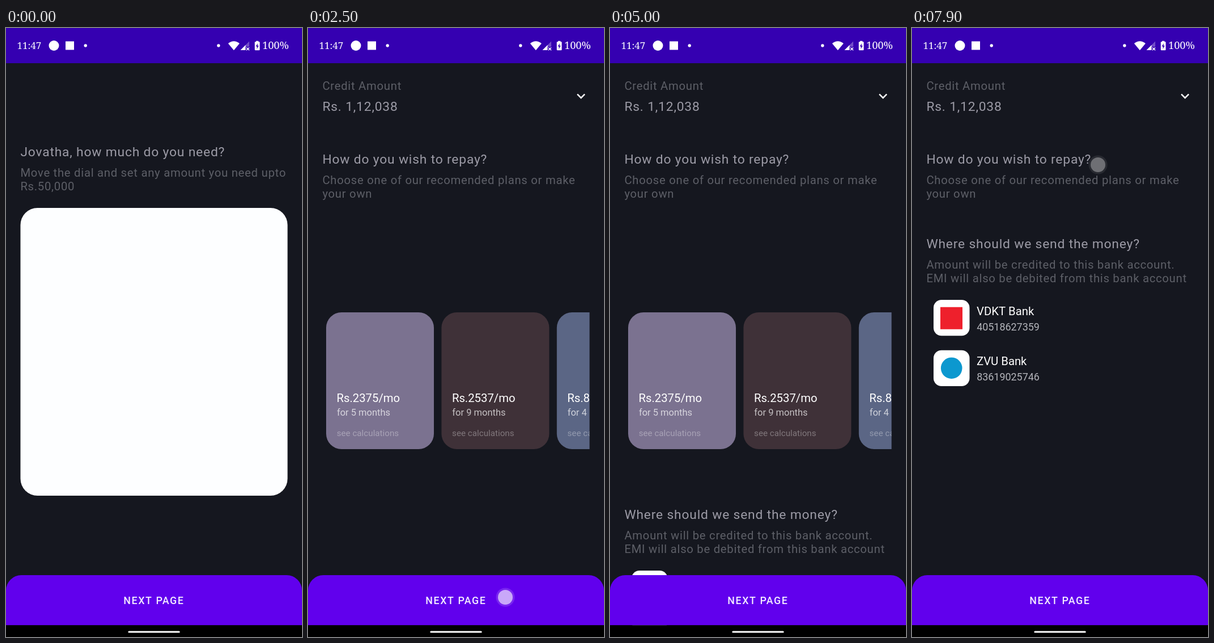
Recreate the animation shown at these times as an HTML page with a canvas. Size 522 by 1073 pixels, loop 8 s.

```html
<!DOCTYPE html>
<html lang="en">
<head>
<meta charset="utf-8">
<title>Loan steps</title>
<style>
  html, body { margin: 0; width: 100%; height: 100%; overflow: hidden; background: #15171f; }
  canvas { display: block; width: 522px; height: 1073px; }
</style>
</head>
<body>
<canvas id="stage"></canvas>
<script>
const W = 522, H = 1073, LOOP = 8000, STEP = 100;
const canvas = document.getElementById('stage');
const ctx = canvas.getContext('2d');
const dpr = window.devicePixelRatio || 1;
canvas.width = W * dpr;
canvas.height = H * dpr;

const SANS = 'Roboto, sans-serif';
const SERIF = '"Noto Serif", serif';
const BG = '#15171f', BRIGHT = '#9c9ba6', DIM = '#5d5f67';

// Taps: start time and place
const TAPS = [[500, 358, 1007], [2500, 348, 1003], [4500, 328, 241], [6000, 332, 1015], [7700, 328, 241]];

const PLANS = [
  { x: 32, color: '#7b7290', rate: 'Rs.2375/mo', term: 'for 5 months' },
  { x: 235.4, color: '#3f3138', rate: 'Rs.2537/mo', term: 'for 9 months' },
  { x: 438.8, color: '#5b6685', rate: 'Rs.8250/mo', term: 'for 4 months' }
];

// Standard curve: cubic-bezier(.4, 0, .2, 1)
function ease(x) {
  if (x <= 0) return 0;
  if (x >= 1) return 1;
  let lo = 0, hi = 1, u = 0.5;
  for (let i = 0; i < 24; i++) {
    u = (lo + hi) / 2;
    const v = 1 - u;
    if (1.2 * v * v * u + 0.6 * v * u * u + u * u * u < x) lo = u; else hi = u;
  }
  return 3 * (1 - u) * u * u + u * u * u;
}

const progress = (t, from, to) => ease((t - from) / (to - from));

function text(str, x, y, size, color, spacing = 0, family = SANS, weight = 400) {
  ctx.font = `${weight} ${size}px ${family}`;
  ctx.letterSpacing = spacing + 'px';
  ctx.fillStyle = color;
  ctx.fillText(str, x, y);
}

const title = (str, x, y) => text(str, x, y, 22.84, BRIGHT, 0.81);
const note = (str, x, y) => text(str, x, y, 20.3, DIM, 0.72);

function box(x, y, w, h, r, color) {
  ctx.fillStyle = color;
  ctx.beginPath();
  ctx.roundRect(x, y, w, h, r);
  ctx.fill();
}

function disc(x, y, r, color) {
  ctx.fillStyle = color;
  ctx.beginPath();
  ctx.arc(x, y, r, 0, Math.PI * 2);
  ctx.fill();
}

function shape(color, ...pts) {
  ctx.fillStyle = color;
  ctx.beginPath();
  pts.forEach(([x, y]) => ctx.lineTo(x, y));
  ctx.fill();
}

function line(width, ...pts) {
  ctx.strokeStyle = '#fff';
  ctx.lineWidth = width;
  ctx.beginPath();
  pts.forEach(([x, y]) => ctx.lineTo(x, y));
  ctx.stroke();
}

const chevron = y => line(2.5, [475, y - 3.5], [481.5, y + 3], [488, y - 3.5]);

function clipped(x, y, w, h, draw) {
  ctx.save();
  ctx.beginPath();
  ctx.rect(x, y, w, h);
  ctx.clip();
  draw();
  ctx.restore();
}

function amountPage() {
  title('Jovatha, how much do you need?', 25.4, 226);
  note('Move the dial and set any amount you need upto', 25.4, 262);
  note('Rs.50,000', 25.4, 286);
  box(25.5, 317, 471, 507, 30, '#fdfeff');
}

function creditRow() {
  note('Credit Amount', 25.4, 109.3);
  title('Rs. 1,12,038', 25.4, 146);
  chevron(120.2);
}

function emiRow() {
  note('EMI', 25.4, 236.2);
  title('Rs. 4,600/mo', 25.4, 266);
  note('Duration', 260.7, 236.2);
  title('12 months', 260.7, 266);
  chevron(243.9);
}

function repayHead(dy = 0) {
  title('How do you wish to repay?', 25.4, 238.7 + dy);
  note('Choose one of our recomended plans or make', 25.4, 274.8 + dy);
  note('your own', 25.4, 298.7 + dy);
}

function plans(dy, bottom) {
  clipped(25, 62, 471.5, bottom - 62, () => {
    for (const p of PLANS) {
      box(p.x, 501 + dy, 190, 241, 27, p.color);
      text(p.rate, p.x + 18.5, 659 + dy, 20.3, '#fff');
      text(p.term, p.x + 18.9, 682.5 + dy, 16.5, 'rgba(255,255,255,.7)');
      text('see calculations', p.x + 18.7, 719 + dy, 15.2, 'rgba(255,255,255,.34)');
    }
  });
}

function account(name, number, y) {
  box(38, y, 63.5, 63.3, 14, '#fff');
  text(name, 114, y + 26.5, 20.3, '#fff');
  text(number, 114.2, y + 53.5, 17.9, '#b4b5bb');
}

// y is the baseline of the heading
function bankSection(y) {
  title('Where should we send the money?', 25.4, y);
  note('Amount will be credited to this bank account.', 25.4, y + 36.2);
  note('EMI will also be debited from this bank account', 25.4, y + 60.1);
  account('VDKT Bank', '40518627359', y + 91.3);
  box(50, y + 104, 39, 39, 0, '#ee202c');
  account('ZVU Bank', '83619025746', y + 180);
  disc(69.7, y + 211.5, 18.8, '#0c98cf');
}

function content(t) {
  if (t < 700) return amountPage();
  creditRow();
  if (t < 2700) {
    const dy = 770 * (1 - progress(t, 700, 1200));
    repayHead(dy);
    plans(dy, 964);
  } else if (t < 4700) {
    emiRow();
    bankSection(365.5 + 620 * (1 - progress(t, 2700, 3200)));
  } else if (t < 6200) {
    const dy = 615 * progress(t, 4700, 5300);
    repayHead();
    plans(0, 340 + dy);
    bankSection(387.7 + dy);
  } else if (t < 7900) {
    emiRow();
    bankSection(365.5 + 620 * (1 - progress(t, 6200, 6700)));
  } else {
    repayHead();
    bankSection(387.7);
  }
}

function statusBar() {
  box(0, 0, W, 62, 0, '#3500b1');
  text('11:47', 19.5, 37, 17, '#fff', 0, SERIF, 500);
  disc(84.5, 31, 9, '#fff');
  box(105, 23.5, 15, 15, 0, '#fff');
  disc(140.2, 31, 2.7, '#fff');
  disc(374.8, 31, 2.7, '#fff');

  ctx.fillStyle = '#fff';
  ctx.beginPath();
  ctx.moveTo(401.8, 39.3);
  ctx.lineTo(391.8, 27.2);
  ctx.quadraticCurveTo(401.8, 19.5, 411.8, 27.2);
  ctx.fill();

  shape('rgba(255,255,255,.3)', [413.5, 39], [429, 23.5], [429, 33], [422, 33], [422, 39]);
  shape('#fff', [413.5, 39], [422.5, 30], [422.5, 39]);
  line(1.5, [424, 34.5], [429, 39.2]);
  line(1.5, [429, 34.5], [424, 39.2]);

  box(441, 22.8, 4.2, 3, 0, '#fff');
  box(438.7, 24.3, 8.8, 15, 1.2, '#fff');
  shape('#3500b1', [443.8, 27], [440.5, 32.6], [442.6, 32.6], [442.4, 37], [445.7, 31.2], [443.6, 31.2]);
  text('100%', 452, 37, 18.2, '#fff', 0, SERIF, 500);
}

function bottomBar() {
  box(0, 964, W, 88.5, [27, 27, 0, 0], '#6100ed');
  text('NEXT PAGE', 207.3, 1015.2, 17.8, '#f4ecff', 1.59, SANS, 500);
  box(0, 1052.3, W, H - 1052.3, 0, '#000');
  box(215.3, 1062.4, 91.4, 3, 1.5, '#fff');
}

function touches(t) {
  for (const [start, x, y] of TAPS) {
    const age = t - start;
    if (age < 0 || age >= 300) continue;
    const a = age < 200 ? 0.68 : 0.37;
    disc(x, y, 16.5, `rgba(255,255,255,${a * 0.22})`);
    disc(x, y, 13, `rgba(255,255,255,${a * 0.88})`);
  }
}

function frame(now) {
  const t = Math.floor((now % LOOP) / STEP) * STEP;
  ctx.setTransform(dpr, 0, 0, dpr, 0, 0);
  box(0, 0, W, H, 0, BG);
  content(t);
  statusBar();
  bottomBar();
  touches(t);
}

const begin = performance.now();
function tick() {
  frame(performance.now() - begin);
  requestAnimationFrame(tick);
}
tick();
</script>
</body>
</html>
```
